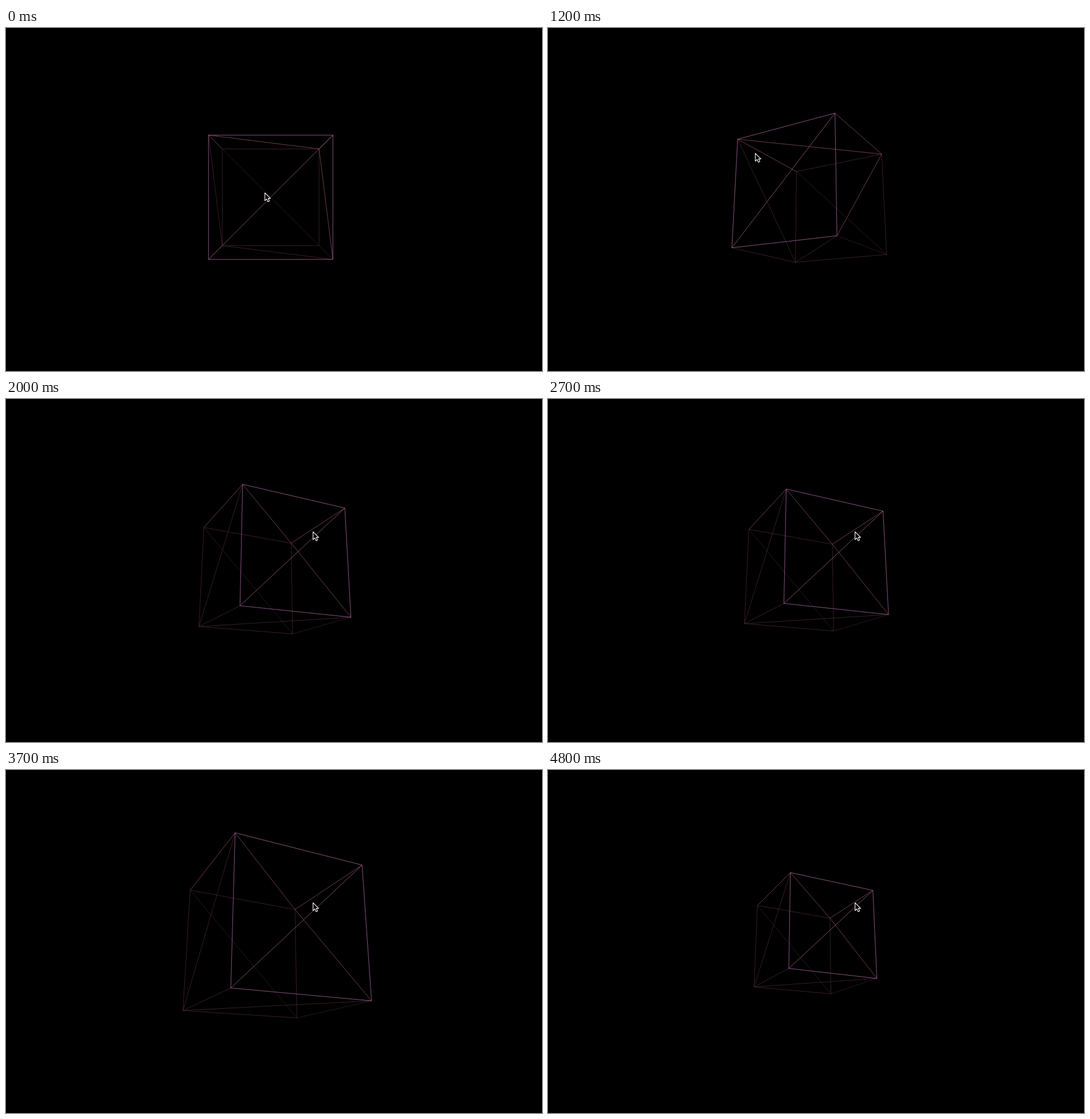
An HTML page that plays this animation: 935 px wide and 599 px high, repeating every 5200 ms.

```html
<!DOCTYPE html>
<html lang="en">
<head>
<meta charset="utf-8">
<title>Wireframe cube</title>
<style>
  html, body { margin: 0; width: 100%; height: 100%; overflow: hidden; background: #000; }
  svg { display: block; width: 935px; height: 599px; }
</style>
</head>
<body>
<svg viewBox="0 0 935 599">
  <g id="cube" fill="none" stroke-width=".75"></g>
  <path id="cursor" d="M.6 .8V14.6L3.7 11.6L6 16.4L8.5 15.2L6.3 10.6H10.4Z" fill="#000" stroke="#fff" stroke-width="1.1" stroke-linejoin="round"/>
</svg>
<script>
const LOOP = 5.2, STEP = .1;
const CENTER = { x: 461.7, y: 295.6 }, FOCAL = 759.5, DISTANCE = 4;
const POINTER = { x: 451, y: 287, perRadian: 183, lead: .05 };

// Turning points of the drag: seconds, yaw, pitch.
const DRAG = [
  [.1, 0, 0], [.3, -.38, .28], [.5, .305, .506], [.7, .52, .25], [.9, -.05, -.26],
  [1.2, -.53, .29], [1.4, -.15, .56], [1.6, .346, .51], [2, .46, .304]
];

// Turning points of the wheel: seconds, clicks. Each click scales the distance by 0.95.
const WHEEL = [
  [2.6, 0], [3.1, -14], [3.2, -14], [3.7, 4], [3.8, 11], [4, 18], [4.3, 18], [4.8, -4]
];

// Corner numbers are bit sums: right 1, top 2, front 4.
const EDGES = {
  "#36221f": "12 51",
  "#4b2a31": "01 13 32 20 40 06 05",
  "#93505f": "62 73 63 53",
  "#a66a82": "47",
  "#b56cae": "67 75 54 46"
};

const cube = document.getElementById("cube");
const cursor = document.getElementById("cursor");
const lines = Object.entries(EDGES).flatMap(([color, pairs]) => pairs.split(" ").map(pair => {
  const line = document.createElementNS("http://www.w3.org/2000/svg", "line");
  line.setAttribute("stroke", color);
  cube.append(line);
  return { line, ends: [...pair].map(Number) };
}));

// Smooth curve through the keys that comes to rest at each extreme.
function follow(keys, time, column) {
  const slope = i => keys[i] && keys[i + 1]
    ? (keys[i + 1][column] - keys[i][column]) / (keys[i + 1][0] - keys[i][0]) : 0;
  const tangent = i => {
    const before = slope(i - 1), after = slope(i);
    return before * after > 0 ? 2 * before * after / (before + after) : 0;
  };
  const next = keys.findIndex(key => key[0] > time);
  if (next === 0) return keys[0][column];
  if (next < 0) return keys[keys.length - 1][column];
  const i = next - 1, span = keys[next][0] - keys[i][0];
  const u = (time - keys[i][0]) / span, v = 1 - u;
  return v * v * (1 + 2 * u) * keys[i][column] + u * u * (1 + 2 * v) * keys[next][column]
    + span * u * v * (v * tangent(i) - u * tangent(next));
}

function project(corner, yaw, pitch, distance) {
  const side = bit => corner & bit ? .5 : -.5;
  const x = side(1) * Math.cos(yaw) + side(4) * Math.sin(yaw);
  const z = side(4) * Math.cos(yaw) - side(1) * Math.sin(yaw);
  const y = side(2) * Math.cos(pitch) + z * Math.sin(pitch);
  const depth = distance + side(2) * Math.sin(pitch) - z * Math.cos(pitch);
  return [CENTER.x + FOCAL * x / depth, CENTER.y - FOCAL * y / depth];
}

function draw(seconds) {
  // The small offset keeps step times on their keys despite rounding.
  const time = Math.floor(seconds % LOOP / STEP + 1e-6) * STEP + 1e-6;
  const yaw = follow(DRAG, time, 1), pitch = follow(DRAG, time, 2);
  const distance = DISTANCE * .95 ** Math.round(follow(WHEEL, time, 1));
  for (const { line, ends } of lines) {
    ends.forEach((corner, i) => {
      const [x, y] = project(corner, yaw, pitch, distance);
      line.setAttribute("x" + (i + 1), x.toFixed(2));
      line.setAttribute("y" + (i + 1), y.toFixed(2));
    });
  }
  // The pointer runs slightly ahead of the cube while dragging.
  const ahead = time + POINTER.lead;
  const px = Math.round(POINTER.x + POINTER.perRadian * follow(DRAG, ahead, 1));
  const py = Math.round(POINTER.y - POINTER.perRadian * follow(DRAG, ahead, 2));
  cursor.setAttribute("transform", `translate(${px} ${py})`);
}

function tick() {
  draw(performance.now() / 1000);
  requestAnimationFrame(tick);
}
tick();
</script>
</body>
</html>
```
